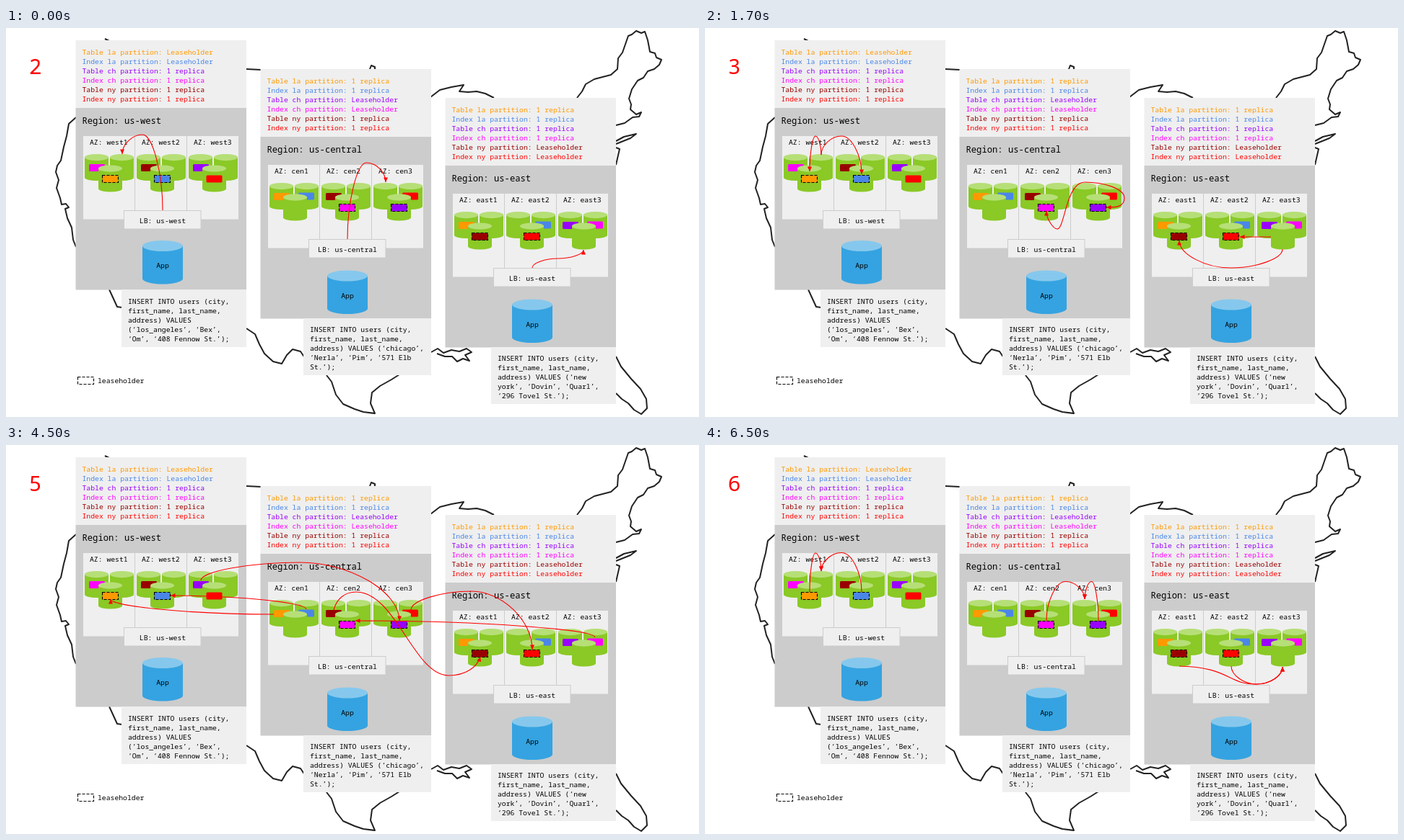
Write an HTML page that moves like this. It is 960 by 540 pixels and loops after 8 s.

```html
<!DOCTYPE html>
<html lang="en">
<head>
<meta charset="utf-8">
<title>Partitioned regions</title>
<style>
html, body { margin: 0; width: 100%; height: 100%; overflow: hidden; background: #fff; }
svg { display: block; width: 960px; height: 540px; }
text { font: 9.75px "Noto Sans Mono", "DejaVu Sans Mono", monospace; }
.title { font-size: 12.2px; }
#step { font-size: 29.5px; fill: #f00; }
.map path { fill: none; stroke: #222; stroke-width: 2; stroke-linejoin: round; }
.arrows path { fill: none; stroke: #f00; stroke-width: 1.1; }
.mid { text-anchor: middle; }
</style>
</head>
<body>
<svg id="stage" viewBox="0 0 960 540"></svg>
<script>
const ORANGE = '#ff9900', BLUE = '#4a86e8', PURPLE = '#9900ff',
      PINK = '#ff00ff', MAROON = '#990000', RED = '#ff0000';
const LOOP = 8000;
const COLORS = [ORANGE, BLUE, PURPLE, PINK, MAROON, RED];
const CITIES = ['la', 'ch', 'ny'];

const rect = (x, y, w, h, fill, extra = '') =>
  `<rect x="${x}" y="${y}" width="${w}" height="${h}" fill="${fill}" ${extra}/>`;
const text = (x, y, s, extra = '') => `<text x="${x}" y="${y}" ${extra}>${s}</text>`;
const dashed = 'stroke="#000" stroke-width="1.1" stroke-dasharray="4 2"';

function cylinder(x, y, w, h, ry, body, lid) {
  const rx = w / 2, top = y + ry, low = y + h - ry;
  return `<path fill="${body}" d="M${x} ${top}V${low}A${rx} ${ry} 0 0 0 ${x + w} ${low}V${top}Z"/>` +
    `<ellipse cx="${x + rx}" cy="${top}" rx="${rx}" ry="${ry}" fill="${lid}"/>`;
}
const node = (x, y) => cylinder(x, y, 33, 37, 4.6, '#8ac926', '#b6df77');
const chip = (x, y, color, lease) =>
  color ? rect(x, y, 22, 10, color, lease ? dashed : 'rx="1.5"') : '';

// zones: [left chip, right chip, front chip, front is leaseholder]
const regions = [
  { name: 'west', az: 'west', noteX: 160, noteH: 80, appY: 295,
    zones: [[PINK, 0, ORANGE, 1], [MAROON, 0, BLUE, 1], [PURPLE, 0, RED, 0]],
    sql: ['address) VALUES', '(‘los_angeles’, ‘Bex’,', '‘Om’, ‘408 Fennow St.’);'] },
  { name: 'central', az: 'cen', noteX: 156, noteH: 79, appY: 296.5,
    zones: [[ORANGE, BLUE, 0, 0], [MAROON, 0, PINK, 1], [0, RED, PURPLE, 1]],
    sql: ['address) VALUES (‘chicago’,', '‘Nerla’, ‘Pim’, ‘571 Elb', 'St.’);'] },
  { name: 'east', az: 'east', noteX: 160, noteH: 79, appY: 296.5,
    zones: [[ORANGE, 0, MAROON, 1], [0, BLUE, RED, 1], [PURPLE, PINK, 0, 0]],
    sql: ['address) VALUES (‘new', 'york’, ‘Dovin’, ‘Quarl’,', '‘296 Tovel St.’);'] }
];

function zone([left, right, front, lease], i, az) {
  const x = 107 + 72 * i;
  return rect(x - .5, 149.5, 72, 116.5, '#efefef', 'stroke="#ccc"') +
    text(x + 9, 161.5, `AZ: ${az}${i + 1}`) +
    node(x + 2, 175) + node(x + 37, 175) +
    chip(x + 8, 189, left) + chip(x + 42, 188.5, right) +
    node(x + 21, 190.5) + chip(x + 26.5, 204.5, front, lease);
}

function region({ name, az, noteX, noteH, appY, zones, sql }, r) {
  const rows = COLORS.map((color, i) => {
    const city = i >> 1;
    return text(105.5, 36.5 + 13 * i, `${i % 2 ? 'Index' : 'Table'} ${CITIES[city]} partition: ` +
      (city === r ? 'Leaseholder' : '1 replica'), `fill="${color}"`);
  });
  const query = ['INSERT INTO users (city,', 'first_name, last_name,', ...sql];
  return `<g transform="translate(${256 * r} ${40 * r})">` +
    rect(96.5, 17, 236.5, 94.5, '#efefef') + rows.join('') +
    rect(96.5, 111, 236.5, 252.5, '#ccc') +
    text(105.5, 133, 'Region: us-' + name, 'class="title"') +
    zones.map((z, i) => zone(z, i, az)).join('') +
    rect(163.5, 253.5, 106.5, 25.5, '#efefef', 'stroke="#ccc"') +
    text(217, 270.5, 'LB: us-' + name, 'class="mid"') +
    cylinder(189, appY, 56, 60.5, 7.5, '#35a3e1', '#86c8ed') +
    text(217, appY + 38, 'App', 'class="mid"') +
    rect(noteX, 363, 333 - noteX, noteH, '#efefef') +
    query.map((s, i) => text(noteX + 9, 382.7 - .7 * (r > 0) + 13 * i, s)).join('') + '</g>';
}

const outline = [
  'M137 15L143 18M97 124L87 133L84 150L80 165L76 184L71 191L69 200L73 211L70 222L75 236L77 245L83 244L87 249L82 251L85 264L91 277L93 294L97 304',
  'M143 363L154 387L161 388M333 57L353 58M504 57L506 52L511 54L511 57',
  'M588 96L601 86L617 82L634 79L628 88L640 89L652 88L664 91L676 97',
  'M791 97L798 88L803 78L815 71L838 65L847 57L848 42L854 34L862 11L867 9L873 4L880 7L885 5L889 17L892 33L899 35L901 41L908 44L905 51L898 57L889 60L883 69L875 73L867 85L863 98L866 106L865 113L873 120L880 117L877 123L868 124L857 132L845 135',
  'M845 157L856 151L873 147L865 153L845 161M845 166L850 168L847 181L845 190',
  'M333 417L345 425L351 439L358 452L370 463L382 466L389 454L397 446L408 449L414 458',
  'M444 482L451 491L457 509L467 522L483 529L495 533L511 535L505 521L507 506L518 497L534 488L545 481',
  'M589 450L598 445L606 451L617 447L628 449L638 445L645 450L636 454L642 462L633 459L625 463L618 456L608 456L597 452',
  'M845 456L852 470L866 487L879 501L887 515L888 528L880 536L870 530L862 521L853 515L845 507'
];

// Leaves and arrives vertically, turning at the given height
function arch(x0, y0, x1, y1, turn) {
  const w = x1 - x0;
  return `M${x0} ${y0}C${x0} ${(y0 + turn) / 2} ${x0 + w / 4} ${turn} ${x0 + w / 2} ${turn}` +
    `S${x1} ${(turn + y1) / 2} ${x1} ${y1}`;
}
// Leaves horizontally, arrives vertically
const bend = (x0, y0, x1, y1) =>
  `M${x0} ${y0}C${(x0 + x1) / 2} ${y0} ${x1} ${(y0 + y1) / 2} ${x1} ${y1}`;

// Links from leaseholder to replica; the first group is also travelled backwards
const near = [
  'M145 214C145 224 258 235 371 235',
  bend(228, 209, 416, 228),
  arch(545, 244, 270, 188, 163),
  bend(484, 244, 816, 267),
  'M657 294C653 308 637 320 613 320C565 320 540 204 485 204C470 204 458 213 454 229',
  arch(729, 284, 561, 229, 203)
];
const far = [
  'M145 214C145 244 386 274 627 274',
  bend(228, 209, 745, 268),
  arch(473, 244, 126, 188, 163),
  arch(545, 244, 782, 268, 212),
  'M657 294C657 312 590 321 480 321C300 321 152 262 152 226C152 210 165 196 187 194',
  arch(729, 294, 289, 215, 322)
];

const scenes = [
  { at: 0, paths: [
    arch(217, 253, 161, 175, 148),
    arch(473, 293, 526, 214, 187),
    arch(729, 333, 800, 308, 320)] },
  { at: 500, paths: [
    arch(161, 176, 217, 203, 150),
    arch(161, 176, 145, 199, 150),
    'M526 214C513 214 506 230 501 247S493 279 488 279S473 266 473 254',
    'M526 214C553 214 581 223 581 236S568 249 556 249',
    arch(800, 307, 657, 295, 333),
    'M784 290H741'] },
  { at: 2500, paths: [...near, ...far] },
  { at: 4500, paths: near, back: true },
  { at: 6500, paths: [
    arch(217, 204, 161, 175, 149.5),
    arch(145, 204, 161, 175, 150),
    arch(473, 244, 526, 214, 189.5),
    arch(545, 244, 526, 214, 189.5),
    'M657 307C725 308 725 332 762 332C785 332 800 320 800 308',
    arch(729, 307, 800, 308, 332)] }
];

const arrows = ({ paths, back }) => '<g class="arrows">' + paths.map(d =>
  `<path d="${d}" marker-${back ? 'start' : 'end'}="url(#head)"/>`).join('') + '</g>';

const stage = document.getElementById('stage');
stage.innerHTML =
  `<defs><marker id="head" markerUnits="userSpaceOnUse" markerWidth="8" markerHeight="8"
    viewBox="0 0 8 8" refX="7" refY="4" orient="auto-start-reverse">
    <polygon points="0.5,1 7,4 0.5,7" fill="#f00"/></marker></defs>` +
  '<g class="map">' + outline.map(d => `<path d="${d}"/>`).join('') + '</g>' +
  regions.map(region).join('') +
  rect(99.5, 484.5, 22, 10, 'none', dashed) + text(127, 492.7, 'leaseholder') +
  text(40.5, 63.5, '2', 'id="step" class="mid"') +
  scenes.map(arrows).join('');

const label = document.getElementById('step');
const groups = stage.querySelectorAll('.arrows');
const start = performance.now();

function draw() {
  const t = (performance.now() - start) % LOOP;
  const current = scenes.filter(s => s.at <= t).length - 1;
  label.textContent = current + 2;
  groups.forEach((g, i) => g.style.display = i === current ? '' : 'none');
  requestAnimationFrame(draw);
}
draw();
</script>
</body>
</html>
```
